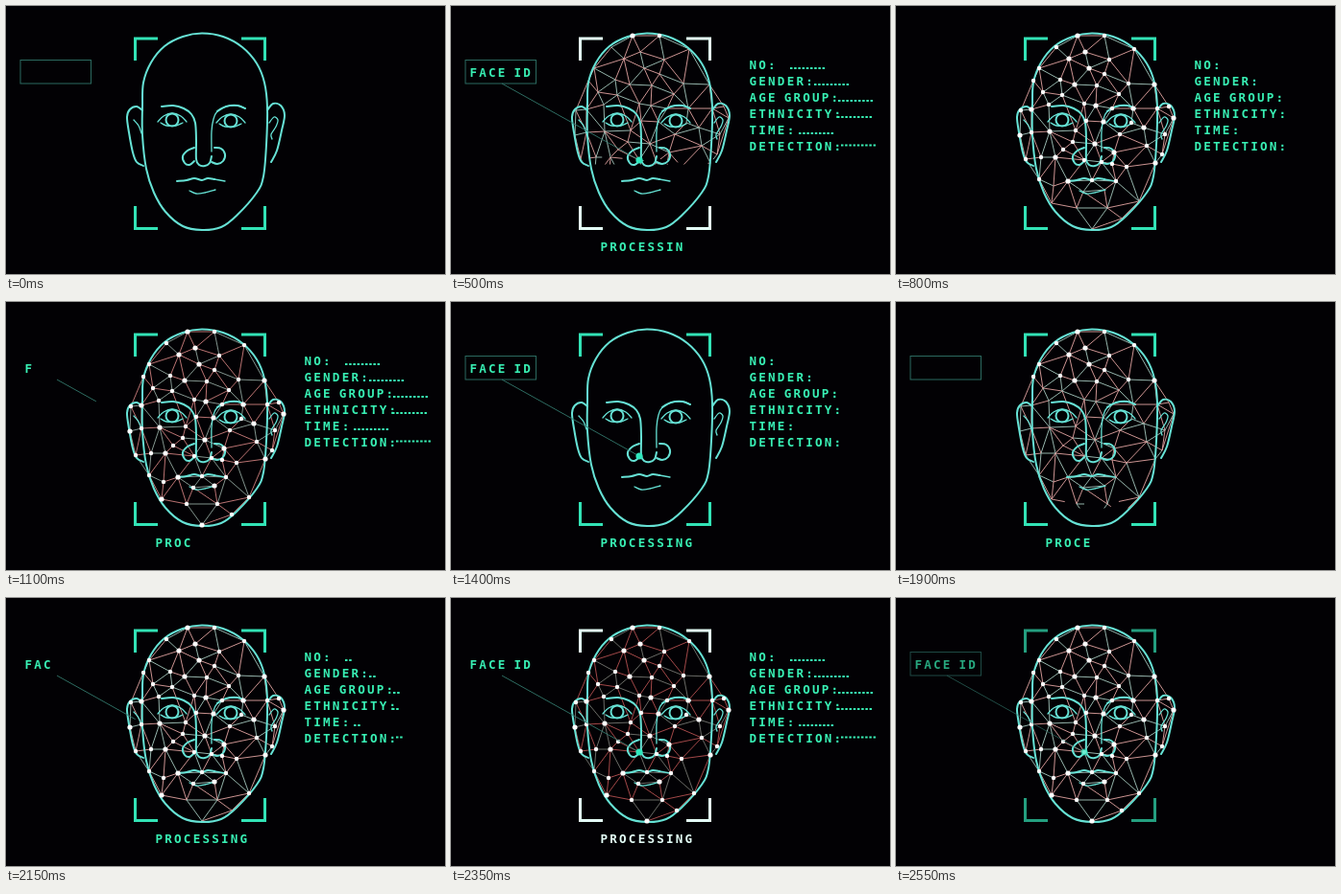
Recreate the animation shown at these times as an HTML page. Size 457 by 280 pixels, loop 2600 ms.

```html
<!DOCTYPE html>
<html lang="en">
<head>
<meta charset="utf-8">
<title>Face scan</title>
<style>
  html, body { margin: 0; width: 100%; height: 100%; overflow: hidden; background: #020104; }
  svg { display: block; width: 100vw; height: 100vh; }
  text { font: bold 12.6px "DejaVu Sans Mono", monospace; letter-spacing: 2.2px; word-spacing: -3px; fill: #38f0b4; white-space: pre; }
  .face path, .face circle { fill: none; stroke: #66e2d5; stroke-width: 2; stroke-linecap: round; stroke-linejoin: round; }
  .face .thin { stroke-width: 1.3; }
  .mesh { stroke-width: 0.9; }
  .dots { fill: #fff; }
  .rows line { stroke: #38f0b4; stroke-width: 2; stroke-dasharray: 2.5 1.7; }
</style>
</head>
<body>
<svg viewBox="0 0 457 280"></svg>
<script>
const LOOP = 2600, STEP = 50;
const svg = document.querySelector('svg');

function add(parent, tag, attrs = {}) {
  const el = document.createElementNS('http://www.w3.org/2000/svg', tag);
  for (const k in attrs) el.setAttribute(k, attrs[k]);
  return parent.appendChild(el);
}
const set = (el, k, v) => el.setAttribute(k, v);
const show = (el, on) => set(el, 'opacity', +on);
const clamp = v => Math.max(0, Math.min(1, v));
const points = s => s.split(' ').map(p => p.split(',').map(Number));

// Smooth curve through the given points
function curve(s, closed) {
  const p = points(s), n = p.length;
  const at = i => closed ? p[(i + n) % n] : p[Math.max(0, Math.min(n - 1, i))];
  let d = 'M' + p[0];
  for (let i = 0; i < (closed ? n : n - 1); i++) {
    const [a, b, c, e] = [at(i - 1), at(i), at(i + 1), at(i + 2)];
    const c1 = b.map((v, k) => v + (c[k] - a[k]) / 6);
    const c2 = c.map((v, k) => v - (e[k] - b[k]) / 6);
    d += `C${c1} ${c2} ${c}`;
  }
  return d;
}

const meshG = add(svg, 'g', { class: 'mesh' });
const faceG = add(svg, 'g', { class: 'face' });
const dotsG = add(svg, 'g', { class: 'dots' });

// Face
const stroke = (s, cls = '') => add(faceG, 'path', { d: curve(s), class: cls });
add(faceG, 'path', { d: curve('142,104 143,80 151,59 165,42 184,32 204,28.5 226,32 246,43 261,60 269,80 272,106 271,145 268,178 261,195 240,219 224,231 204,234 184,230 166,215 154,195 146,170 142,135', true) });
stroke('142,109 136,105 129,108 126,116 128,132 132,153 136,163 143,167');
stroke('133,119 138,125 141,133', 'thin');
stroke('272,109 278,102 286,104 290,114 287,130 282,151 276,163');
stroke('274,122 279,116 283,119 281,126 276,134 277,139', 'thin');
stroke('162,105 174,104 185,107 193,113 197,122 198,140 198,160 201,166 207,167 212,164 214,157');
stroke('249,107 241,104 229,105 220,110 216,118 214,131 214,152', 'thin');
stroke('249,107 241,104 229,105 220,110');
stroke('196,148 189,151 184,157 186,164 191,166 196,162');
stroke('217,148 224,149 228,155 226,162 220,165 214,163');
for (const x of [0, 61]) {
  stroke([[158, 121], [164, 115], [173, 112], [182, 115], [188, 121]].map(([a, b]) => [a + x, b + x / 61]).join(' '), 'thin');
  stroke([[161, 122], [167, 125], [177, 125], [184, 122]].map(([a, b]) => [a + x, b + x / 61]).join(' '), 'thin');
  add(faceG, 'circle', { cx: 173 + x, cy: 119 + x / 61, r: 6.5 });
}
stroke('178,183 188,182 196,180 204,182 210,180 217,181');
stroke('217,181 228,183', 'thin');
stroke('191,193 198,196 207,195 218,192', 'thin');

// Mesh: Delaunay edges over facial landmarks
const brow = points('189,31 217,31 167,43 197,48 248,45 222,56 180,55 149,65 171,77 201,65 217,71 143,78 186,82 209,83 242,81 269,82 153,90 173,93 141,108 159,103 196,102 208,104 232,92 225,107 247,107 272,107');
const cheek = points('198,120 216,121 245,122 141,132 160,131 187,130 233,134 258,127 261,146 151,158 166,158 174,150 184,142 207,144 196,161 214,163 227,153 225,165 240,168 270,164');
const jaw = points('149,181 164,188 179,183 204,182 195,194 217,192 229,183 253,204 162,206 188,211 220,211 204,233 235,222');
const ears = points('130,109 129,135 135,160 284,105 289,117 280,134 277,155');
const P = [...brow, ...cheek, ...jaw, ...ears];

function emptyCircle(a, b, c) {
  const d = 2 * (a[0] * (b[1] - c[1]) + b[0] * (c[1] - a[1]) + c[0] * (a[1] - b[1]));
  if (Math.abs(d) < 1e-6) return false;
  const [A, B, C] = [a, b, c].map(([x, y]) => x * x + y * y);
  const x = (A * (b[1] - c[1]) + B * (c[1] - a[1]) + C * (a[1] - b[1])) / d;
  const y = (A * (c[0] - b[0]) + B * (a[0] - c[0]) + C * (b[0] - a[0])) / d;
  const r = Math.hypot(a[0] - x, a[1] - y) - 1e-6;
  return P.every(p => Math.hypot(p[0] - x, p[1] - y) >= r);
}
function nearEye(a, b) {
  return [[173, 119], [234, 120]].some(e => {
    const v = [b[0] - a[0], b[1] - a[1]];
    const u = clamp(((e[0] - a[0]) * v[0] + (e[1] - a[1]) * v[1]) / (v[0] ** 2 + v[1] ** 2));
    return Math.hypot(a[0] + u * v[0] - e[0], a[1] + u * v[1] - e[1]) < 8;
  });
}
const edges = new Map();
function link(i, j) {
  const [a, b] = [P[i], P[j]].sort((p, q) => p[1] - q[1]);
  if (Math.hypot(a[0] - b[0], a[1] - b[1]) > 46 || nearEye(a, b)) return;
  edges.set(i + '-' + j, { a, b });
}
for (let i = 0; i < P.length; i++)
  for (let j = i + 1; j < P.length; j++)
    for (let k = j + 1; k < P.length; k++)
      if (emptyCircle(P[i], P[j], P[k])) { link(i, j); link(j, k); link(i, k); }

const lines = [...edges.values()].map((e, i) => ({
  ...e, pink: i % 5 < 3, el: add(meshG, 'line', { x1: e.a[0], y1: e.a[1] })
}));
const nodes = P.map(([x, y], i) => ({ y, el: add(dotsG, 'circle', { cx: x, cy: y, r: i % 3 ? 2.2 : 2.6 }) }));

// Corner brackets
const corners = add(svg, 'path', {
  d: 'M158,34H134.5V57M245,34H269.5V57M158,232.5H134.5V209M245,232.5H269.5V209',
  fill: 'none', 'stroke-width': 3
});

// Callout
const tag = add(svg, 'g');
const box = add(tag, 'rect', { x: 15, y: 56.5, width: 73.5, height: 24.5, fill: 'none', stroke: '#2b6a60' });
const tagText = add(tag, 'text', { x: 19.5, y: 73.5 });
const lead = add(tag, 'line', { x1: 53, y1: 81, stroke: '#33786c', 'stroke-width': 0.9 });
const tip = add(tag, 'circle', { cx: 196, cy: 161, r: 3.6, fill: '#2fe8bd' });

// Data rows
const rowsG = add(svg, 'g', { class: 'rows' });
const rows = [['NO:', 353], ['GENDER:', 378], ['AGE GROUP:', 403], ['ETHNICITY:', 402], ['TIME:', 362], ['DETECTION:', 406]]
  .map(([label, x], i) => {
    const y = 65.5 + 17 * i, dy = i === 5 ? 145.5 : y - 0.5;
    return { label, x, text: add(rowsG, 'text', { x: 310.5, y }), dots: add(rowsG, 'line', { x1: x, y1: dy, y2: dy }) };
  });

const status = add(svg, 'text', { x: 155.5, y: 255.5 });
const STATUS_STARTS = [0, 850, 1625];

function drawMesh(m) {
  const sweep = 28 + (m - 225) * 0.5, dotSweep = 28 + (m - 487) * 0.5;
  const red = clamp(1 - Math.abs(m - 1040) / 100);
  const mix = (from, to) => `rgb(${from.map((v, i) => Math.round(v + (to[i] - v) * red))})`;
  const pink = mix([226, 164, 162], [176, 72, 72]);
  const pale = mix([165, 200, 190], [112, 110, 104]);
  for (const { a, b, el, pink: isPink } of lines) {
    const u = clamp((sweep - a[1]) / Math.max(18, b[1] - a[1]));
    show(el, u > 0);
    set(el, 'x2', a[0] + (b[0] - a[0]) * u);
    set(el, 'y2', a[1] + (b[1] - a[1]) * u);
    set(el, 'stroke', isPink ? pink : pale);
  }
  for (const { y, el } of nodes) show(el, y <= dotSweep);
  const flash = (m >= 450 && m < 550) || (m >= 1000 && m < 1100);
  set(corners, 'stroke', flash ? '#e4fff8' : '#32e3b6');
  set(corners, 'opacity', m >= 1200 ? 0.7 : 1);
}

function drawTag(t) {
  const c = t % 950, blink = t % 520;
  const grow = clamp((c - 50) / 350);
  set(tag, 'opacity', c < 650 ? 1 : c < 750 ? 0.7 : 0);
  show(box, blink < 40 || blink >= 300);
  tagText.textContent = 'FACE ID'.slice(0, Math.max(0, Math.floor((c - 100) / 50)));
  set(lead, 'x2', 53 + 143 * grow);
  set(lead, 'y2', 81 + 80 * grow);
  show(lead, grow > 0);
  show(tip, grow === 1);
}

function drawRows(c) {
  show(rowsG, c < 550);
  const w = Math.round(clamp((c - 150) / 250) * 9) * 4.2;
  for (const { label, x, text, dots } of rows) {
    text.textContent = label.slice(0, c / 10);
    set(dots, 'x2', x + w);
    show(dots, w > 0);
  }
}

function drawStatus(t) {
  const p = t - STATUS_STARTS.filter(s => s <= t).pop();
  status.textContent = p < 775 ? 'PROCESSING'.slice(0, Math.floor(p / 52)) : '';
  status.style.fill = p >= 700 ? '#e4fff8' : '';
}

function draw(ms) {
  const t = Math.floor((ms % LOOP) / STEP) * STEP;
  drawMesh(t % 1300);
  drawTag(t);
  drawRows(t % 650);
  drawStatus(t);
}

const start = performance.now();
function tick() {
  draw(performance.now() - start);
  requestAnimationFrame(tick);
}
tick();
</script>
</body>
</html>
```
